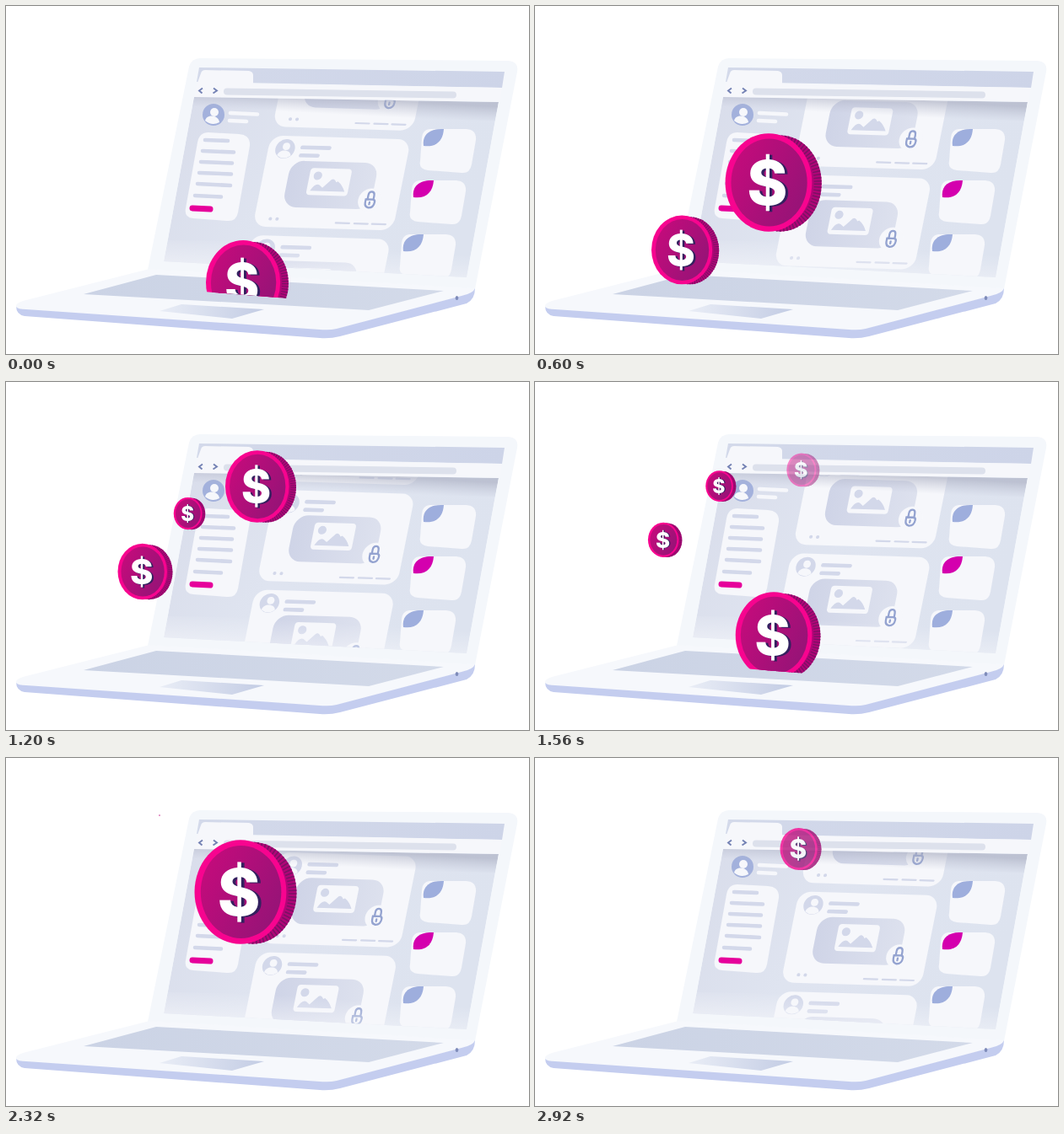
Animation of 620 by 413 pixels, one loop 2960 ms. Source, as an HTML page:

```html
<!DOCTYPE html>
<html lang="en">
<head>
<meta charset="utf-8">
<title>Coins from a laptop</title>
<style>
  html, body { margin: 0; width: 100%; height: 100%; overflow: hidden; background: #fff; }
  svg { display: block; width: 100vw; height: 100vh; }
  text { font: 800 64px Inter, "Liberation Sans", sans-serif; text-anchor: middle; }
  .line { fill: none; stroke: #d3d8ea; stroke-width: 4.6; stroke-linecap: round; }
  .ink { fill: none; stroke: #94a3d0; stroke-width: 2.3; stroke-linecap: round; }
  .paper { fill: #f6f7fb; }
</style>
</head>
<body>
<svg viewBox="0 0 620 413">
  <defs>
    <linearGradient id="wall" x2="1" y2=".3">
      <stop stop-color="#d8dcea"/><stop offset=".45" stop-color="#dfe4f0"/><stop offset="1" stop-color="#dde3ef"/>
    </linearGradient>
    <linearGradient id="strip" x2="1">
      <stop stop-color="#d3d9ea"/><stop offset="1" stop-color="#cdd4e8"/>
    </linearGradient>
    <linearGradient id="shade" gradientUnits="userSpaceOnUse" x1="400" y1="110" x2="399" y2="129">
      <stop stop-color="#a9adc0" stop-opacity=".62"/><stop offset="1" stop-color="#b9bdd0" stop-opacity="0"/>
    </linearGradient>
    <linearGradient id="glow" gradientUnits="userSpaceOnUse" x1="368" y1="284" x2="366" y2="314">
      <stop stop-color="#f6f7fb" stop-opacity="0"/><stop offset="1" stop-color="#f6f7fb" stop-opacity=".5"/>
    </linearGradient>
    <linearGradient id="keys" x2="1">
      <stop stop-color="#cbd3e5"/><stop offset="1" stop-color="#d3dae9"/>
    </linearGradient>
    <linearGradient id="pad" x2="1">
      <stop stop-color="#e9edf6"/><stop offset="1" stop-color="#c3cce4"/>
    </linearGradient>
    <linearGradient id="bar" x2="1">
      <stop stop-color="#cfd4e7"/><stop offset="1" stop-color="#dde1ee"/>
    </linearGradient>
    <linearGradient id="face" x2="1" y2=".6">
      <stop stop-color="#c90a7c"/><stop offset="1" stop-color="#981377"/>
    </linearGradient>
    <clipPath id="screen"><path d="M223 108 584 114 546 322 187 303Z"/></clipPath>
    <clipPath id="slot"><path d="M0 0H620V370L0 320Z"/></clipPath>

    <g id="person">
      <circle r="11.5" fill="#d3d8ea"/>
      <circle cx="1" cy="-3" r="4.4" class="paper"/>
      <path d="M-8 8C-7 0 7 0 8 8Q0 14-8 8Z" class="paper"/>
    </g>

    <g id="card">
      <rect width="166" height="108" rx="15" class="paper"/>
      <use href="#person" x="20" y="15.5"/>
      <path class="line" d="M40 13H72M40 22.500H60"/>
      <rect x="30" y="29" width="104" height="55" rx="16" fill="url(#bar)"/>
      <rect x="55" y="37" width="49" height="32" rx="4" class="paper"/>
      <circle cx="65" cy="46" r="5" fill="#d3d8ea"/>
      <path d="M59 64Q64 54 69 57L73 60 82 50Q85 48 88 53L90 52Q96 56 100 64Z" fill="#d3d8ea"/>
      <circle cx="132" cy="73" r="14" class="paper"/>
      <path class="ink" d="M129 72V67Q129 63 132.500 63T136 68V71M127 72H135Q138 72 138 75 138 82 132 82 127 81 127 76ZM132 75.500V78"/>
      <path class="line" d="M19 98.500H19.100M27 98.500H27.100" style="stroke-width:4"/>
      <path class="line" d="M97 101H113M119 101H135M140 101H156" style="stroke-width:2.2"/>
    </g>

    <g id="tile">
      <path class="paper" d="M12 0H56Q68 1 67 13L62 42Q60 53 50 52L10 49Q-1 48 1 38L3 10Q4 1 12 0Z"/>
      <path d="M5 20C3 6 13-1 29 0 28 14 20 22 5 20Z"/>
    </g>

    <g id="coin">
      <ellipse cx="7" cy="1" rx="43" ry="50" fill="#b00577"/>
      <ellipse cx="7" cy="1" rx="39" ry="46" fill="none" stroke="#7b1064" stroke-width="8" stroke-dasharray="1.300 2"/>
      <ellipse cx="-5" cy="0" rx="45" ry="51" fill="#f7048f"/>
      <ellipse cx="-4.500" cy="0" rx="39.500" ry="45.500" fill="url(#face)"/>
      <text x="-3.500" y="24" fill="#33205f">$</text>
      <text x="-6.500" y="23" fill="#fff">$</text>
    </g>
  </defs>

  <!-- lid -->
  <path fill="#f4f7fb" d="M217 72Q220 62 230 62L596 65Q608 66 606 78L556 336 168 313Z"/>
  <path fill="url(#strip)" d="M229 73 591 78 588 97 226 90Z"/>
  <path class="paper" d="M227 91 231 80Q232 76 236 76L288 77Q293 78 293 82V92L588 97 585 114 223 108Z"/>
  <path d="M262 101.500 530 105.500" fill="none" stroke="#dde1ec" stroke-width="8" stroke-linecap="round"/>
  <path d="M233 97.500 229 100.500 232.500 103.500M246 97.500 250 100.500 245.500 103.500" fill="none" stroke="#7482b4" stroke-width="1.900"/>

  <g clip-path="url(#screen)">
    <path d="M223 107 584 113 546 323 187 304Z" fill="url(#wall)"/>
    <circle cx="246" cy="129" r="13" fill="#a3b1dc"/>
    <circle cx="247" cy="126" r="5" class="paper"/>
    <path d="M236 136C238 128 252 129 253 138Q244 143 236 136Z" class="paper"/>
    <path class="line" style="stroke:#f6f7fb" d="M266 127 298 128.500M265 136 285 137"/>
    <path class="paper" d="M240 150 276 152Q290 153 289 166L275 245Q273 256 262 255L222 252Q211 251 213 240L227 162Q229 150 240 150Z"/>
    <path class="line" d="M236 159 263 160M233 172 270 173.500M231 185 268 186.500M229 198 267 199.500M227 211 266 213M224 225 255 226.500"/>
    <path d="M221 240 242 241" fill="none" stroke="#e6009b" stroke-width="7" stroke-linecap="round"/>
    <use href="#tile" x="490" y="146" fill="#9eaedd"/>
    <use href="#tile" x="478" y="207" fill="#d400ae"/>
    <use href="#tile" x="466" y="271" fill="#9eaedd"/>
    <g id="feed"></g>
    <path d="M223 108 584 114 580 136 219 130Z" fill="url(#shade)"/>
    <path d="M192 278 553 284 546 323 187 304Z" fill="url(#glow)"/>
  </g>

  <!-- base -->
  <path fill="#c4cdef" d="M12 356Q12 366 22 368L372 394Q384 395 396 392L546 353Q556 348 556 335L385 374Z"/>
  <path fill="#f6f8fc" d="M12 357Q11 353 20 350L170 312 556 335Q554 341 540 344L392 383Q384 385 372 384L24 360Q14 360 12 357Z"/>
  <path fill="url(#keys)" d="M92 342 178 319 519 338 430 361Z"/>
  <path fill="url(#pad)" d="M182 362 208 354 306 360 268 371Z"/>
  <ellipse cx="534.500" cy="346.500" rx="1.800" ry="2.600" fill="#7f8cba"/>

  <g id="coins"></g>
</svg>
<script>
  const LOOP = 2960, STEP = 40, PITCH = 118.4, SLANT = -0.2;
  const NS = "http://www.w3.org/2000/svg";

  // Points: time, x, y, width, opacity
  const rise = [
    [-160, 283, 400, 92, 1], [0, 286, 328, 98, 1], [360, 291, 258, 106, 1], [440, 286, 241, 110, 1],
    [800, 280.5, 171, 119, 1], [880, 284, 159, 121, 1], [1200, 302, 124, 84, 1],
    [1400, 312, 112, 59, 1], [1480, 315, 108, 49, .78], [1680, 322, 99, 24, 0]
  ];
  const left = [
    [100, 178, 340, 0, 1], [360, 174.5, 316, 53, 1], [800, 179.5, 267, 91, 1],
    [1200, 165, 225, 65, 1], [1880, 144.5, 154, 18.5, 1], [2160, 134, 126, 0, 1]
  ];
  const middle = [
    [720, 187, 192, 0, 1], [800, 194, 186, 10, 1], [1200, 217.5, 156, 37.5, 1],
    [1400, 221, 138, 42, 1], [1880, 214, 96, 20, 1], [2320, 182, 68, 1, 1], [2340, 181, 67, 0, 1]
  ];

  function make(href, parent) {
    const el = document.createElementNS(NS, "use");
    el.setAttribute("href", href);
    parent.append(el);
    return el;
  }

  function addCoin(path, start, clipped) {
    const group = document.createElementNS(NS, "g");
    if (clipped) group.setAttribute("clip-path", "url(#slot)");
    document.getElementById("coins").append(group);
    return { path, start, el: make("#coin", group) };
  }

  const feed = document.getElementById("feed");
  for (let i = -1; i < 3; i++) {
    const y = i * PITCH;
    make("#card", feed).setAttribute("transform", `matrix(1 .03 ${SLANT} 1 ${314 + y * SLANT} ${153.5 + y})`);
  }

  const coins = [
    addCoin(left, 0), addCoin(middle, 0), addCoin(rise, 0, true), addCoin(rise, 1440, true)
  ];

  // Smooth curve through unevenly spaced points
  function sample(path, t) {
    const i = path.findIndex((p, n) => n && t < p[0]) - 1;
    if (i < 0 || t < path[0][0]) return null;
    const a = path[i], b = path[i + 1];
    const before = path[i - 1] || a, after = path[i + 2] || b;
    const span = b[0] - a[0], u = (t - a[0]) / span;
    return a.map((v, k) => {
      if (k === 4) return v + (b[4] - v) * u;
      const m = (b[k] - before[k]) / (b[0] - before[0]) * span;
      const n = (after[k] - v) / (after[0] - a[0]) * span;
      const d = b[k] - v;
      return v + u * (m + u * (3 * d - 2 * m - n + u * (m + n - 2 * d)));
    });
  }

  function draw(now) {
    const t = Math.floor(now % LOOP / STEP) * STEP;
    const shift = -PITCH * (t * 3 / LOOP % 1);
    feed.setAttribute("transform", `translate(${shift * SLANT} ${shift})`);
    for (const { path, start, el } of coins) {
      const p = sample(path, t - start);
      el.style.display = p ? "" : "none";
      if (!p) continue;
      el.setAttribute("transform", `translate(${p[1]} ${p[2]}) scale(${Math.max(p[3], 0) / 100})`);
      el.setAttribute("opacity", p[4]);
    }
  }

  const begin = performance.now();
  function tick() {
    draw(performance.now() - begin);
    requestAnimationFrame(tick);
  }
  tick();
</script>
</body>
</html>
```
